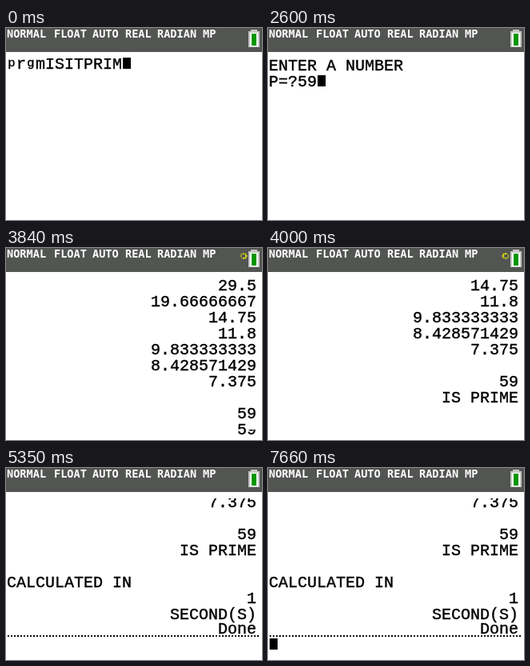
Animation of 320x240 px, one loop 7.99 s. Source, as an HTML page:

```html
<!DOCTYPE html>
<html lang="en">
<head>
<meta charset="utf-8">
<title>Calculator prime check</title>
<style>
  html, body { margin: 0; width: 100%; height: 100%; overflow: hidden; background: #fff; }
  svg { display: block; width: 100vw; height: 100vh; }
  rect, line { shape-rendering: crispEdges; }
  .mode { font: bold 13.6px "DejaVu Sans Mono", monospace; fill: #fff; }
  .row { font: 20px "Liberation Mono", monospace; fill: #000; stroke: #000; stroke-width: .4px; }
  .small { font-size: 15.5px; }
</style>
</head>
<body>
<svg id="screen" viewBox="0 0 320 240">
  <defs><clipPath id="view"><rect y="38" width="320" height="202"/></clipPath></defs>
  <rect width="320" height="240" fill="#fff"/>
  <rect width="320" height="30" fill="#525552"/>
  <g id="mode" class="mode"></g>
  <g id="battery">
    <rect x="306" y="2" width="8" height="3" fill="#c6c6c6"/>
    <rect x="303" y="4" width="14" height="20" fill="#c6c6c6"/>
    <rect x="305" y="6" width="10" height="17" fill="#fff"/>
    <rect x="307" y="7" width="6" height="15" fill="#009600"/>
  </g>
  <g id="spinner" stroke="#ffff00" stroke-width="2"></g>
  <g id="rows" clip-path="url(#view)"></g>
  <rect id="patch" x="301" y="218" width="13" height="9" fill="#fff"/>
  <line id="divider" x1="2" x2="316" y1="210" y2="210" stroke="#000" stroke-width="2" stroke-dasharray="2 2"/>
  <rect id="cursor" width="10" height="14" fill="#000"/>
</svg>
<script>
const LOOP = 7990, ROW = 20, CELL = 12, FIRST = 53;
const $ = id => document.getElementById(id);

function add(parent, tag, attrs, text) {
  const node = document.createElementNS("http://www.w3.org/2000/svg", tag);
  for (const key in attrs) node.setAttribute(key, attrs[key]);
  if (text) node.textContent = text;
  parent.append(node);
  return node;
}

const show = (node, on) => node.setAttribute("visibility", on ? "visible" : "hidden");

// Mode bar and busy ring
[["NORMAL", 1], ["FLOAT", 60], ["AUTO", 108], ["REAL", 149], ["RADIAN", 189], ["MP", 246]]
  .forEach(([word, x]) => add($("mode"), "text", { x, y: 12 }, word));

const spokes = Array.from({ length: 8 }, (_, i) => {
  const a = i * Math.PI / 4, c = Math.cos(a), s = Math.sin(a);
  return add($("spinner"), "line", {
    x1: 297 + 2.3 * c, y1: 10 + 2 * s, x2: 297 + 4.7 * c, y2: 10 + 4 * s,
    style: "shape-rendering:auto"
  });
});

// Home screen content
const quotients = [2, 3, 4, 5, 6, 7, 8].map(d => String(+(59 / d).toPrecision(10)));
const output = ["ENTER A NUMBER", "P=?", ...quotients, "", "59", "IS PRIME",
  "", "CALCULATED IN", "1", "SECOND(S)", "Done"];
const leftLines = [0, 1, 13];

const command = () => {
  "prgmISITPRIM".split("").forEach((ch, i) => {
    const tail = "pg".includes(ch);
    add($("rows"), "text", {
      class: tail ? "row small" : "row",
      x: 1 + i * CELL + (tail ? 1.3 : 0), y: tail ? 48 : 51
    }, ch);
  });
};

function line(text, y, left) {
  add($("rows"), "text", { class: "row", x: left ? 1 : 313, y, "text-anchor": left ? "start" : "end" }, text);
}

function list(top, end, typed = "59") {
  for (let i = top; i < end; i++)
    line(output[i] + (i === 1 ? typed : ""), FIRST + (i - top) * ROW, leftLines.includes(i));
}

function result(end) {
  for (let i = 8; i < end; i++)
    line(output[i], i === 16 ? 207 : 49 + (i - 8) * ROW, leftLines.includes(i));
}

// Each scene: start time, drawing, and options
const scenes = [];
const scene = (t, draw, opts = {}) => scenes.push({ t, draw, ...opts });
const busy = { busy: true };
const blank = () => {};
const prompt = typed => () => list(0, 2, typed);
const rows = (top, end) => () => list(top, end);

[0, 330, 660, 1030].forEach((t, i) => scene(t, command, { cursor: i % 2 ? null : [12, 37] }));
scene(1360, blank, busy);
scene(1500, command, busy);
scene(1540, command, busy);
scene(1580, blank, busy);
scene(1720, rows(0, 1), busy);
scene(1860, prompt(""), busy);
scene(1900, prompt(""), { cursor: [3, 59] });
scene(2230, prompt(""));
scene(2270, prompt("5"), { cursor: [4, 59] });
scene(2600, prompt("59"), { cursor: [5, 59] });
scene(2930, prompt("59"));

[[3260, 0, 2], [3300, 0, 3], [3340, 0, 4], [3380, 0, 5], [3470, 0, 6], [3510, 0, 7],
 [3550, 0, 8], [3590, 0, 9], [3630, 0, 10], [3670, 1, 10], [3760, 1, 11], [3800, 1, 11]]
  .forEach(([t, top, end]) => scene(t, rows(top, end), busy));
// Scrolling leaves the old last row half erased for a moment
scene(3840, () => { list(2, 11); line("59", FIRST + 9 * ROW); }, { busy: true, patch: true });
[[3880, 2, 12], [3920, 3, 12], [3960, 3, 13], [4000, 4, 13], [4040, 4, 14],
 [4080, 5, 14], [4120, 5, 15], [4160, 6, 16], [4200, 7, 15], [4240, 7, 17]]
  .forEach(([t, top, end]) => scene(t, rows(top, end), busy));
scene(4280, () => result(16), busy);
scene(4320, () => result(17), { busy: true, divider: true });
for (let i = 0; i < 11; i++)
  scene(4360 + i * 330, () => result(17), { divider: true, cursor: i % 2 ? null : [0, 213] });

let current = -1;

function render(time) {
  const t = time % LOOP;
  let index = scenes.length - 1;
  while (scenes[index].t > t) index--;
  if (index === current) return;
  current = index;

  const s = scenes[index];
  $("rows").replaceChildren();
  s.draw();
  show($("patch"), s.patch);
  show($("divider"), s.divider);
  show($("cursor"), s.cursor);
  if (s.cursor) {
    $("cursor").setAttribute("x", 2 + s.cursor[0] * CELL);
    $("cursor").setAttribute("y", s.cursor[1]);
  }
  show($("spinner"), s.busy);
  spokes.forEach((spoke, i) =>
    spoke.setAttribute("opacity", t < 1720 ? 1 : 0.3 + 0.7 * ((i + 8 - index % 8) % 8) / 7));
}

const start = performance.now();
function tick() {
  render(performance.now() - start);
  requestAnimationFrame(tick);
}
tick();
</script>
</body>
</html>
```
